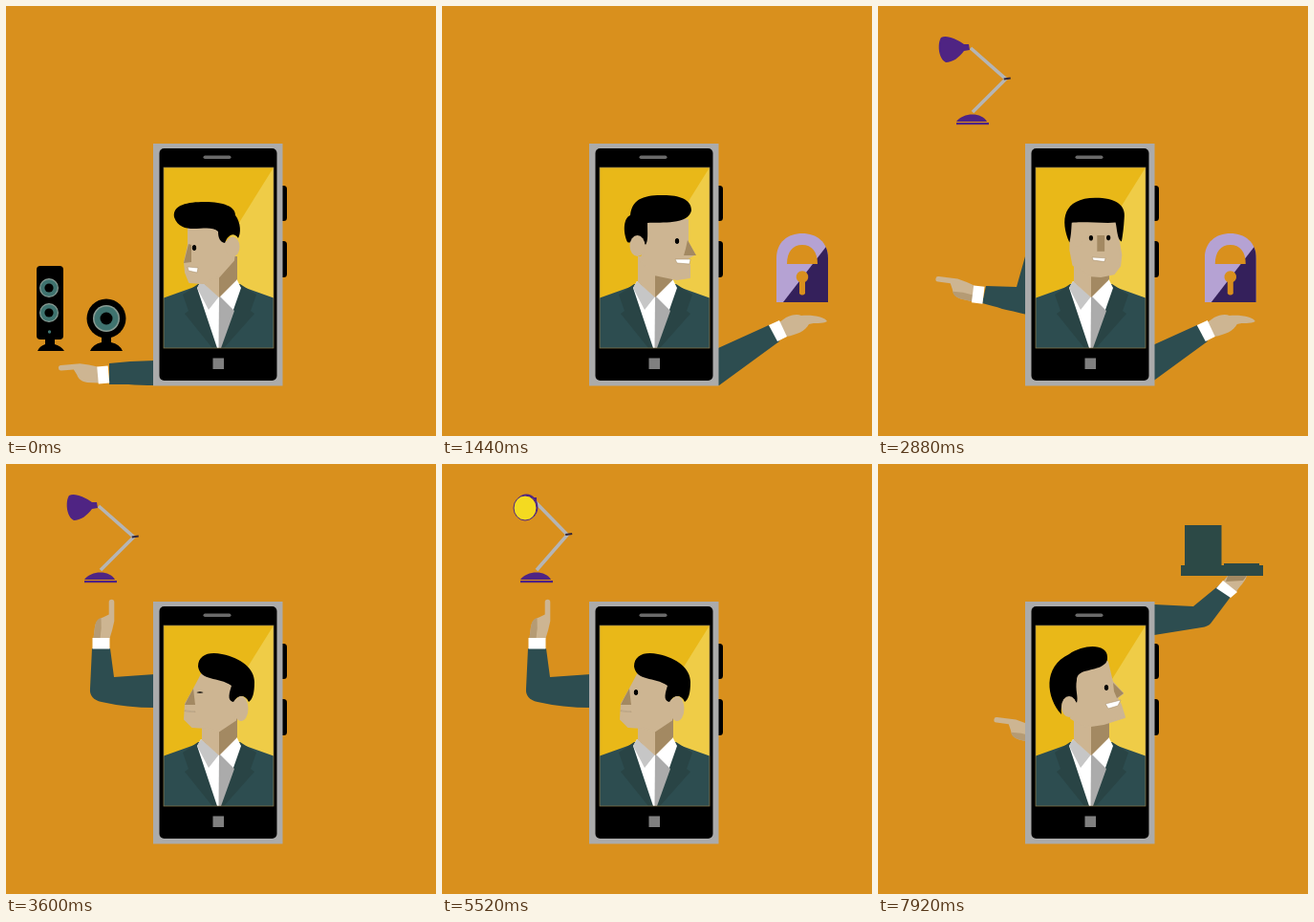
Animation of 450x450 px, one loop 8 s. Source, as an HTML page:

```html
<!DOCTYPE html>
<html lang="en">
<head>
<meta charset="utf-8">
<title>Phone presenter</title>
<style>
html, body { margin: 0; width: 100%; height: 100%; overflow: hidden; background: #d9901d; }
svg { display: block; width: 100vw; height: 100vh; }
.skin { fill: #cdb592; }
.shade { fill: #a38962; }
.suit { fill: #2d4d50; }
.lapel { fill: #294445; }
.white { fill: #fff; }
.grey { fill: #ababab; }
.purple { fill: #4f2483; }
.ring { fill: #8a9c94; }
.cone { fill: #3f736f; }
</style>
</head>
<body>
<svg viewBox="0 0 450 450">
  <defs>
    <clipPath id="lockClip"><path d="M350,310V264C350,247 362,238 377,238C392,238 404,247 404,264V310Z"/></clipPath>
  </defs>
  <rect width="450" height="450" fill="#d9901d"/>

  <g id="speakers">
    <rect x="32" y="272" width="28" height="77" rx="4"/>
    <path d="M41,347H51V354Q58,356 61,361H33Q35,356 41,354Z"/>
    <g id="tweeters"></g>
    <circle cx="45.5" cy="341" r="1.7" class="cone"/>
    <circle cx="105" cy="327" r="20.5"/>
    <path d="M100,345H110V352Q119,354 122,361H88Q91,354 100,352Z"/>
    <circle cx="105" cy="327" r="14" class="ring"/>
    <circle cx="105" cy="327" r="12.5" class="cone"/>
    <circle cx="105" cy="327" r="6.5"/>
  </g>

  <g id="lamp">
    <path id="rod" fill="none" stroke="#b5b5b5" stroke-width="3.6"/>
    <path id="joint" stroke="#33273a" stroke-width="2"/>
    <g id="lampHead">
      <g id="shadeOff" class="purple">
        <path d="M-31,-11C-25,-14 -14,-9 -7,-4L-2,-4L-1,2L-7,3C-12,10 -19,15 -26,15C-34,11 -35,-5 -31,-11Z"/>
      </g>
      <g id="shadeOn">
        <ellipse cx="-8.6" cy="6" rx="12" ry="13.5" class="purple"/>
        <rect x="-3" y="-4" width="5" height="6" class="purple"/>
        <ellipse cx="-10" cy="7" rx="12" ry="13" fill="#f4da20" stroke="#4f2483"/>
      </g>
    </g>
    <g id="lampBase" class="purple">
      <path d="M-17,10C-10,0 10,0 15,10Z"/>
      <rect x="-17" y="11" width="34" height="2.2"/>
    </g>
  </g>

  <g id="leftArm">
    <path id="sleeve" class="suit"/>
    <g id="hand">
      <path class="skin" d="M-8,-5L-6.5,-17C-5.5,-23 -2,-26 2,-27L8.2,-30V-43A2.8,2.8 0 0 1 13.8,-43V-23Q12,-14 9,-5Z"/>
      <path id="palm" fill="#b59b74" d="M-8,-5L-6.5,-17C-5.5,-23 -4,-25 0,-26.5Q1,-16 -1,-5Z"/>
      <rect class="white" x="-9" y="-5.5" width="18" height="11.5"/>
    </g>
  </g>

  <g id="lockArm">
    <path class="suit" d="M250,375L289,358L342,334L353,351L290,397H250Z"/>
    <path class="skin" d="M353,331L360,326C366,323 372,322 376,324C390,323 401,326 403,330C398,333 390,331 384,333C380,340 372,344 360,346Z"/>
    <path class="white" d="M342,334L353,329L361,346L351,351Z"/>
    <g id="lock">
      <g clip-path="url(#lockClip)">
        <rect x="350" y="238" width="54" height="72" fill="#b5a2d3"/>
        <path d="M405,248V310H357Z" fill="#34205b"/>
      </g>
      <path d="M361,270C361,257 367,250 377,250C387,250 393,257 393,270Z" fill="#d9901d"/>
      <path d="M374,301V289A6.3,6.3 0 1 1 380,289V301Q377,304 374,301Z" fill="#d9901d"/>
    </g>
  </g>

  <g id="laptopArm">
    <path class="suit" d="M230,147H289L330,149L358,126L369,139L348,167Q345,170 339,171L289,179L230,190Z"/>
    <path class="skin" d="M361,123L366,117H386C384,124 378,128 375,134Z"/>
    <path class="shade" d="M366,117H386L382,122L364,123Z"/>
    <path class="white" d="M354,130L361,122L376,134L369,140Z"/>
    <path fill="#2c4946" d="M321,64H359.5V106H362V104H399V106H403V117H317V106H321Z"/>
  </g>

  <g id="phone">
    <rect x="284" y="188" width="10" height="37" rx="3.5"/>
    <rect x="284" y="246" width="10" height="38" rx="3.5"/>
    <rect class="grey" x="154" y="144" width="135.5" height="253.5"/>
    <rect x="160.5" y="149" width="123" height="243" rx="5"/>
    <rect x="206.5" y="156.5" width="29" height="3.6" rx="1.8" fill="#6a6a6a"/>
    <rect x="216.5" y="368.5" width="11.5" height="11.5" fill="#808080"/>
    <rect x="165" y="169" width="115" height="189" fill="#e9b818"/>
    <path d="M280,169V310H192Z" fill="#efcc47"/>
    <path class="suit" d="M165,305.5L200,293H245L280,305.5V358H165Z"/>
    <path class="lapel" d="M201,291L185,302L191,319L187,322L216,358H228L260,322L256,319L262,302L245,291Z"/>
    <path class="white" d="M204,288L200,295L221,358H224L246,295L241,285L223,303Z"/>
    <path fill="#c6c6c6" d="M204,288L223,304L212,318L200,295Z"/>
    <path class="grey" d="M223,303L239,319L225,358H222.5Z"/>
    <path class="skin" d="M205,262H241V287L223,305L205,289Z"/>
    <path class="shade" d="M223,262H242V286L223,305Z"/>
    <path id="face" fill="#cdb592" stroke="#cdb592" stroke-width="2" stroke-linejoin="round"/>
    <path id="nose" class="shade"/>
    <path id="mouth" class="white" stroke="#a38962" stroke-width=".5"/>
    <path id="hair"/>
    <ellipse id="ear" class="skin"/>
    <ellipse id="eyeA"/>
    <ellipse id="eyeB"/>
    <rect x="165" y="169" width="115" height="189" fill="none" stroke="#8f7d4a" stroke-width=".7"/>
  </g>
</svg>
<script>
const LOOP = 8000;
const $ = id => document.getElementById(id);
const set = (id, attrs) => { for (const k in attrs) $(id).setAttribute(k, attrs[k]); };

// Head poses share one path structure, so any two can be blended.
const left = {
  hair: 'M176,221C174,208 190,205 208,205C228,205 240,210 240,219C246,227 246,238 243,243C239,237 233,238 229,248C224,247 222,243 222,236C212,226 184,243 176,221Z',
  face: 'M191,231L222,228L228,246L240,252L238,266L222,284L206,290L192,289L188,279L187,268L191,250Z',
  nose: 'M191,249L194,250L194,268L186,269Z',
  mouth: 'M190,273L201,274L200,279L191,277Z',
  eyes: '197 253 197 253', ear: '237 252 7.5 10.5'
};
const right = {
  hair: 'M194,247C189,236 190,222 197,219C199,200 214,198 232,198C248,198 261,202 261,214C258,229 230,226 215,227C215,238 216,246 213,250C206,240 198,250 194,247Z',
  face: 'M214,222L257,224L257,247L264,260L257,264L259,272L259,284L246,286L222,281L208,268L212,250Z',
  nose: 'M257,245L266,261L253,261L255,254Z',
  mouth: 'M244,265L260,265L259,270L246,269Z',
  eyes: '246 246 246 246', ear: '204.5 251 8 11'
};
const frontRight = {
  hair: 'M202,248C192,225 194,201 230,201C250,201 262,208 260,222C259,232 258,240 257,247C252,247 252,232 250,227C238,229 214,224 204,227C204,232 204,240 202,248Z',
  face: 'M203,224L251,224L252,240L256,262L255,274L249,282L236,283L224,282L207,270L203,255L203,240Z',
  nose: 'M232,240L240,240L240,257L232,257Z',
  mouth: 'M226,263L240,264L239,268L227,266Z',
  eyes: '225 243 243 243', ear: '197 244 5.5 8'
};
const frontLeft = {
  hair: 'M194,246C184,222 190,201 218,200C240,200 251,208 249,222C250,232 249,240 247,244C243,238 243,230 243,225C230,223 208,229 198,226C196,232 196,240 194,246Z',
  face: 'M197,224L244,224L246,240L248,254L246,264L238,274L222,283L204,282L194,274L195,256L196,240Z',
  nose: 'M219,240L226,240L226,256L219,256Z',
  mouth: 'M217,263L231,263L229,266L218,266Z',
  eyes: '215 242 234 241', ear: '252 243 6 8.5'
};
const upLeft = {
  hair: 'M201,212C201,200 212,196 226,199C246,203 260,214 260,228C260,240 258,246 254,249C250,240 242,242 238,249C233,248 232,244 236,232C222,222 204,228 201,212Z',
  face: 'M205,220L234,222L238,240L242,255L240,268L222,280L210,276L195,275L187,267L188,251L197,235Z',
  nose: 'M196,235L198,252L187,252L190,246Z',
  mouth: 'M187,258L198,259L198,259.6L187,258.6Z',
  eyes: '203 239 203 239', ear: '246 256 7.5 13'
};
const upRight = {
  hair: 'M192,262C176,245 172,212 200,199C216,188 240,188 240,202C241,212 228,214 216,217C210,219 208,222 208,226C206,236 210,244 208,250C200,238 190,246 192,262Z',
  face: 'M208,216L240,207L245,228L256,240L250,245L254,252L258,265L236,272L216,275L202,266L205,245Z',
  nose: 'M246,229L257,240L250,245L247,238Z',
  mouth: 'M238,251L254,247L251,253L241,256Z',
  eyes: '239 234 239 234', ear: '200 254 8 11'
};
const headKeys = [
  [0, left], [320, left], [480, frontLeft], [700, right], [1640, right], [1840, frontRight],
  [2840, frontRight], [2980, frontLeft], [3200, upLeft], [6800, upLeft], [7040, frontLeft],
  [7440, frontLeft], [7560, frontRight], [7720, upRight]
];
const blinks = [[3520, 3680], [6080, 6160], [6400, 6480]];

// Arm poses: sleeve outline, then wrist position and hand angle.
const low = {
  sleeve: 'M108,374L130,372L156,371L172,371L172,397L156,397Q140,397 128,396Q122,396 118,396L108,396Z',
  hand: 'translate(101.5 386) rotate(-95)'
};
const side = {
  sleeve: 'M113,293L145,294L156,255L172,255L172,323L156,323Q140,319 130,317Q125,315 120,314L109,311Z',
  hand: 'translate(104.5 302) rotate(-83)'
};
const raised = {
  sleeve: 'M109,193L113,223L156,220L172,220L172,255L156,255Q126,255 100,249Q87,246 88,235L90,193Z',
  hand: 'translate(99.5 187.5) rotate(0)'
};
const upper = {
  sleeve: 'M74,183L112,204L156,213L172,216L172,254L156,249Q130,241 108,230Q103,227 98,224L63,198Z',
  hand: 'translate(64.5 188) rotate(-49.5)'
};
const armKeys = [
  [0, low], [900, low], [901, side], [2920, side], [3240, raised],
  [6760, raised], [7200, upper], [7400, upper], [7640, side]
];
const armShift = [
  [0, 'translate(0 0)'], [160, 'translate(0 0)'], [480, 'translate(115 0)'],
  [1480, 'translate(115 0)'], [1720, 'translate(-16 0)'], [1840, 'translate(0 0)'],
  [7660, 'translate(0 0)'], [7920, 'translate(61 -18)']
];
const speakerShift = [[0, 'translate(0 0)'], [160, 'translate(0 0)'], [560, 'translate(140 0)']];
const lockArmShift = [
  [0, 'translate(-135 0)'], [480, 'translate(-135 0)'], [940, 'translate(9 0)'], [1120, 'translate(0 0)'],
  [2720, 'translate(0 0)'], [2820, 'translate(7 0)'], [3120, 'translate(-135 0)']
];
const lockToss = [[700, 'translate(0 0)'], [920, 'translate(0 -84)'], [1160, 'translate(0 0)']];
const laptopShift = [
  [7290, 'translate(-150 100)'], [7610, 'translate(-8 -5)'], [7760, 'translate(3 1)'], [7880, 'translate(0 0)']
];
const lampDrop = [[1840, 'translate(0 -150)'], [2120, 'translate(0 0)']];
const lampBaseX = [[7040, '99'], [7280, '37'], [7600, '-95']];
const lampHeadPos = [
  [2120, '97 39'], [2200, '95 46'], [2320, '97 39'], [2440, '97 39'], [2640, '97 44'],
  [3680, '97 44'], [3900, '93 43'], [4200, '97 44'],
  [4480, '97 44'], [5000, '72 24'], [5320, '69 22'], [5440, '97 39'],
  [7080, '97 39'], [7280, '71 39'], [7640, '-95 39']
];
const lampTilt = [[4480, '0'], [5000, '9'], [5320, '9'], [5440, '0']];

const smooth = u => u * u * (3 - 2 * u);
const linear = u => u;
const NUM = /-?\d*\.?\d+/g;

function mix(a, b, u) {
  if (a === b || u <= 0) return a;
  const to = b.match(NUM);
  let i = 0;
  return a.replace(NUM, n => +(+n + (to[i++] - n) * u).toFixed(2));
}

function track(keys, t, part, ease = smooth) {
  const get = key => part ? key[1][part] : key[1];
  const next = keys.findIndex(key => key[0] > t);
  if (next < 0) return get(keys[keys.length - 1]);
  if (next === 0) return get(keys[0]);
  const a = keys[next - 1], b = keys[next];
  return mix(get(a), get(b), ease((t - a[0]) / (b[0] - a[0])));
}

const show = (id, on) => { $(id).style.display = on ? '' : 'none'; };
const numbers = s => s.split(' ').map(Number);

function drawHead(t) {
  for (const id of ['hair', 'face', 'nose', 'mouth']) set(id, { d: track(headKeys, t, id) });
  const [ex, ey, rx, ry] = numbers(track(headKeys, t, 'ear'));
  set('ear', { cx: ex, cy: ey, rx, ry });
  const shut = blinks.some(([from, to]) => t >= from && t < to);
  const size = shut ? { rx: 3.5, ry: 0.45 } : { rx: 2.1, ry: 2.8 };
  const [ax, ay, bx, by] = numbers(track(headKeys, t, 'eyes'));
  set('eyeA', { cx: ax, cy: ay, ...size });
  set('eyeB', { cx: bx, cy: by, ...size });
}

function drawLamp(t) {
  const bx = +track(lampBaseX, t, null, linear), by = 111;
  const [hx, hy] = numbers(track(lampHeadPos, t));
  // Two equal rods: the elbow sits to the right of the base-head line.
  const dx = hx - bx, dy = hy - by, dist = Math.hypot(dx, dy);
  const bend = Math.sqrt(Math.max(0, 49 * 49 - dist * dist / 4)) / dist;
  const x = (bx + hx) / 2 - dy * bend, y = (by + hy) / 2 + dx * bend;
  set('rod', { d: `M${hx},${hy}L${x},${y}L${bx},${by}` });
  set('joint', { d: `M${x - 2},${y}l7,-1` });
  set('lampHead', { transform: `translate(${hx} ${hy}) rotate(${track(lampTilt, t)})` });
  set('lampBase', { transform: `translate(${bx} ${by})` });
  set('lamp', { transform: track(lampDrop, t) });
  const lit = t >= 5400;
  show('shadeOn', lit);
  show('shadeOff', !lit);
  show('lamp', t >= 1840 && t < 7700);
}

function drawArms(t) {
  set('sleeve', { d: track(armKeys, t, 'sleeve') });
  set('hand', { transform: track(armKeys, t, 'hand') });
  show('palm', t > 900);
  set('leftArm', { transform: track(armShift, t) });
  show('leftArm', t < 480 || t > 1480);
  set('speakers', { transform: track(speakerShift, t) });
  show('speakers', t < 560);
  set('lockArm', { transform: track(lockArmShift, t) });
  set('lock', { transform: track(lockToss, t) });
  show('lockArm', t > 480 && t < 3120);
  set('laptopArm', { transform: track(laptopShift, t) });
  show('laptopArm', t > 7290);
}

$('tweeters').innerHTML = [295, 321].map(y =>
  [['ring', 10], ['cone', 8.8], ['', 4.6]].map(([c, r]) =>
    `<circle cx="45" cy="${y}" r="${r}" class="${c}"/>`).join('')).join('');

function draw(t) {
  drawHead(t);
  drawLamp(t);
  drawArms(t);
}

const start = performance.now();
function tick() {
  draw((performance.now() - start) % LOOP);
  requestAnimationFrame(tick);
}
draw(0);
requestAnimationFrame(tick);
</script>
</body>
</html>
```
